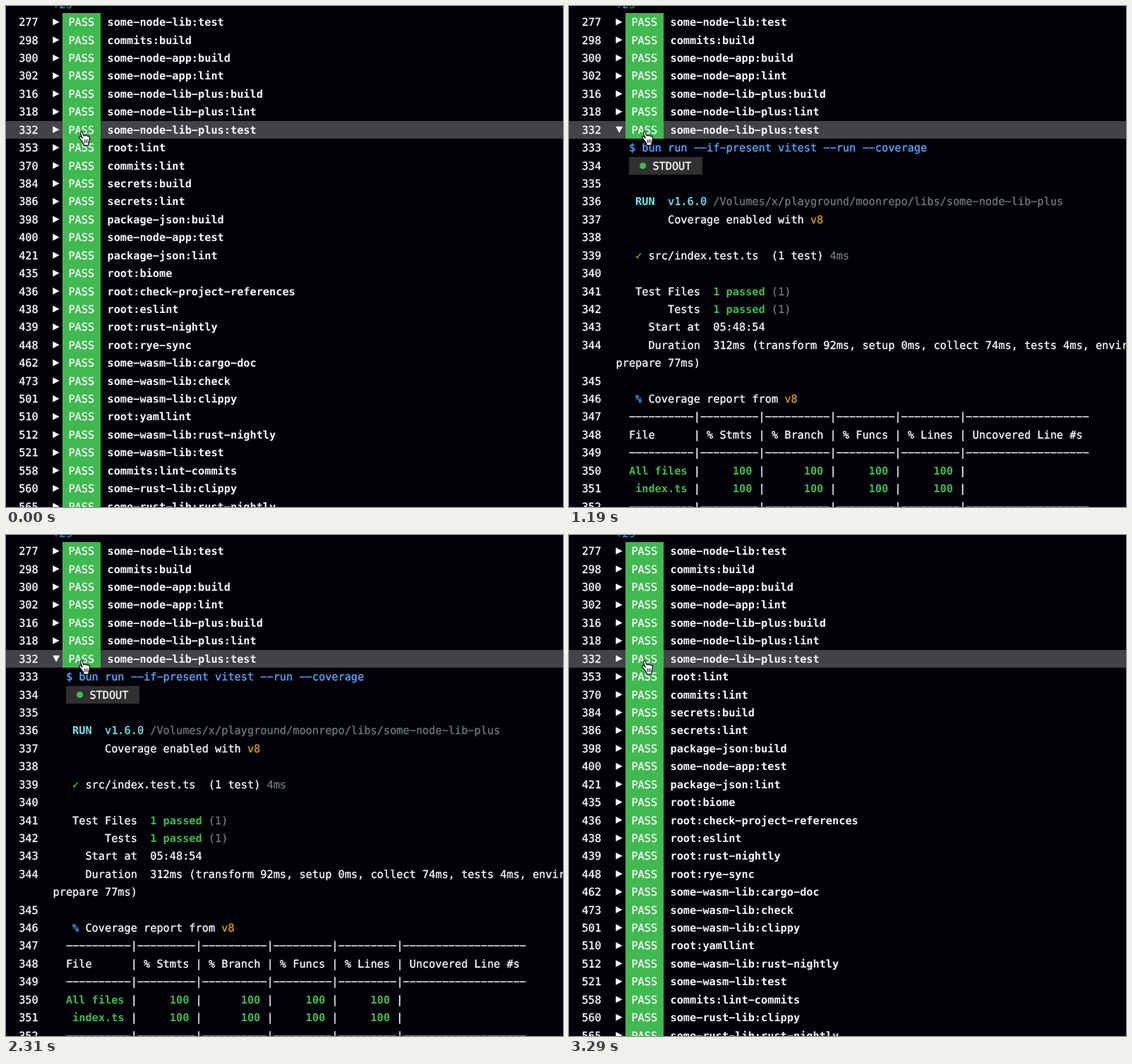
Write an HTML page that moves like this. It is 789 px wide and 710 px high and loops after 3.36 s.

```html
<!DOCTYPE html>
<html lang="en">
<head>
<meta charset="utf-8">
<title>Task log</title>
<style>
html, body { margin: 0; width: 100%; height: 100%; overflow: hidden; background: #010208; }
svg { display: block; width: 789px; height: 710px; }
text {
  font: 15.25px "DejaVu Sans Mono", monospace;
  text-rendering: geometricPrecision;
  white-space: pre;
  color: #f8f9fa;
  fill: currentColor;
  stroke: currentColor;
  stroke-width: 0.35px;
}
.b { font-weight: bold; stroke-width: 0; }
.blue { color: #58a6ff; }
.cyan { color: #76e3ea; }
.gray { color: #70747b; }
.green { color: #3fb950; }
.gold { color: #d29922; }
.time { color: #2a86b8; }
</style>
</head>
<body>
<svg id="stage" viewBox="0 0 789 710" xmlns="http://www.w3.org/2000/svg"></svg>
<script>
const LOOP = 3360, OPEN_AT = 700, CLOSE_AT = 2450;
const ROW = 25.42, CHAR = 9.18, LEFT = 84.9, ACTIVE = 6;
const stage = document.getElementById("stage");

function add(parent, tag, attrs, content) {
  const el = document.createElementNS("http://www.w3.org/2000/svg", tag);
  for (const key in attrs) el.setAttribute(key, attrs[key]);
  if (content) el.textContent = content;
  parent.appendChild(el);
  return el;
}

const mid = row => 22.7 + ROW * row;
const box = (parent, x, y, width, height, fill) =>
  add(parent, "rect", { x, y, width, height, fill });

// The minus sign gives the long dash of the terminal face.
const write = (parent, row, x, str, cls = "") =>
  add(parent, "text", { x, y: mid(row) + 5.5, class: cls }, str.replace(/-/g, "\u2212"));

function arrow(parent, row, down) {
  const y = mid(row);
  const points = down
    ? `66.2,${y - 4.4} 76.2,${y - 4.4} 71.2,${y + 4.8}`
    : `66.3,${y - 4.9} 75.6,${y} 66.3,${y + 4.9}`;
  add(parent, "polygon", { points, fill: "#fff" });
}

function task(parent, row, [num, name], down) {
  write(parent, row, 18.2, num);
  arrow(parent, row, down);
  write(parent, row, 88.4, "PASS");
  write(parent, row, 143.5, name, "b");
}

const tasks = `277 some-node-lib:test
298 commits:build
300 some-node-app:build
302 some-node-app:lint
316 some-node-lib-plus:build
318 some-node-lib-plus:lint
332 some-node-lib-plus:test
353 root:lint
370 commits:lint
384 secrets:build
386 secrets:lint
398 package-json:build
400 some-node-app:test
421 package-json:lint
435 root:biome
436 root:check-project-references
438 root:eslint
439 root:rust-nightly
448 root:rye-sync
462 some-wasm-lib:cargo-doc
473 some-wasm-lib:check
501 some-wasm-lib:clippy
510 root:yamllint
512 some-wasm-lib:rust-nightly
521 some-wasm-lib:test
558 commits:lint-commits
560 some-rust-lib:clippy
565 some-rust-lib:rust-nightly`.split("\n").map(line => line.split(" "));

const rule = [[0, [10, 9, 10, 9, 9, 19].map(n => "-".repeat(n)).join("|")]];
const scores = (col, name) => [
  [col, name, "green b"],
  ...[10, 20, 31, 41, 51].map(c => [c, "|"]),
  ...[16, 27, 37, 47].map(c => [c, "100", "green b"])
];

// Each output line is a list of [column, text, class].
const output = [
  [[0, "$ bun run --if-present vitest --run --coverage", "blue"]],
  [],
  [],
  [[1, "RUN", "cyan b"], [6, "v1.6.0", "cyan"],
    [13, "/Volumes/x/playground/moonrepo/libs/some-node-lib-plus", "gray"]],
  [[6, "Coverage enabled with"], [28, "v8", "gold"]],
  [],
  [[1, "✓", "green"], [3, "src/index.test.ts"], [22, "(1 test)"], [31, "4ms", "gray"]],
  [],
  [[1, "Test Files"], [13, "1 passed", "green b"], [22, "(1)", "gray"]],
  [[6, "Tests"], [13, "1 passed", "green b"], [22, "(1)", "gray"]],
  [[3, "Start at"], [13, "05:48:54"]],
  [[3, "Duration"],
    [13, "312ms (transform 92ms, setup 0ms, collect 74ms, tests 4ms, environment 0ms,"]],
  [[-2, "prepare 77ms)"]],
  [],
  [[1, "%", "blue b"], [3, "Coverage report from"], [24, "v8", "gold"]],
  rule,
  [[0, "File      | % Stmts | % Branch | % Funcs | % Lines | Uncovered Line #s"]],
  rule,
  scores(0, "All files"),
  scores(1, "index.ts"),
  rule
];
const WRAPPED = 12;

box(stage, 0, 0, 789, 710, "#010208");
box(stage, 0, 163, 789, 25, "#414349");
write(stage, -1, 66.3, "+2s", "time");
box(stage, 80, 10, 54, 178, "#3fb950");
tasks.slice(0, ACTIVE).forEach((t, i) => task(stage, i, t));

const closed = add(stage, "g", {});
box(closed, 80, 188, 54, 522, "#3fb950");
tasks.slice(ACTIVE).forEach((t, i) => task(closed, ACTIVE + i, t));

const opened = add(stage, "g", {});
task(opened, ACTIVE, tasks[ACTIVE], true);
box(opened, 85, 214, 104, 25, "#303030");
add(opened, "circle", { cx: 104.6, cy: 226.5, r: 4.6, fill: "#3fb950" });
write(opened, 8, 118.4, "STDOUT");
output.forEach((parts, i) => {
  const row = ACTIVE + 1 + i;
  if (i !== WRAPPED) write(opened, row, 18.2, String(333 + i - (i > WRAPPED)));
  for (const [col, str, cls] of parts) write(opened, row, LEFT + col * CHAR, str, cls);
});

const hand = add(stage, "g", { stroke: "#111", "stroke-linejoin": "round", "stroke-linecap": "round" });
add(hand, "path", {
  fill: "#fff", "stroke-width": 1.3,
  d: "M107.6 191.6L104.2 187.4C102.6 185.4 104.6 183.9 106.2 185.3L108.1 187.2L105.5 180.4" +
    "C104.8 178.1 107.4 177.3 108.3 179.4L110.3 184.3C110.4 182.6 112.6 182.5 113 184.2" +
    "C113.5 182.8 115.5 183.1 115.8 184.8C116.5 183.9 118.2 184.3 118.4 186.2" +
    "C118.7 189.2 118.7 191.8 117.2 194.2L117 197.4L109.9 197.4L109.7 195.2Z"
});
add(hand, "path", { fill: "none", "stroke-width": 1, d: "M111.3 189.5V194M113.6 189.5V194M115.9 189.5V194" });

function draw(time) {
  const t = time % LOOP;
  const isOpen = t >= OPEN_AT && t < CLOSE_AT;
  opened.setAttribute("visibility", isOpen ? "visible" : "hidden");
  closed.setAttribute("visibility", isOpen ? "hidden" : "visible");
}

const start = performance.now();
function tick() {
  draw(performance.now() - start);
  requestAnimationFrame(tick);
}
tick();
</script>
</body>
</html>
```
